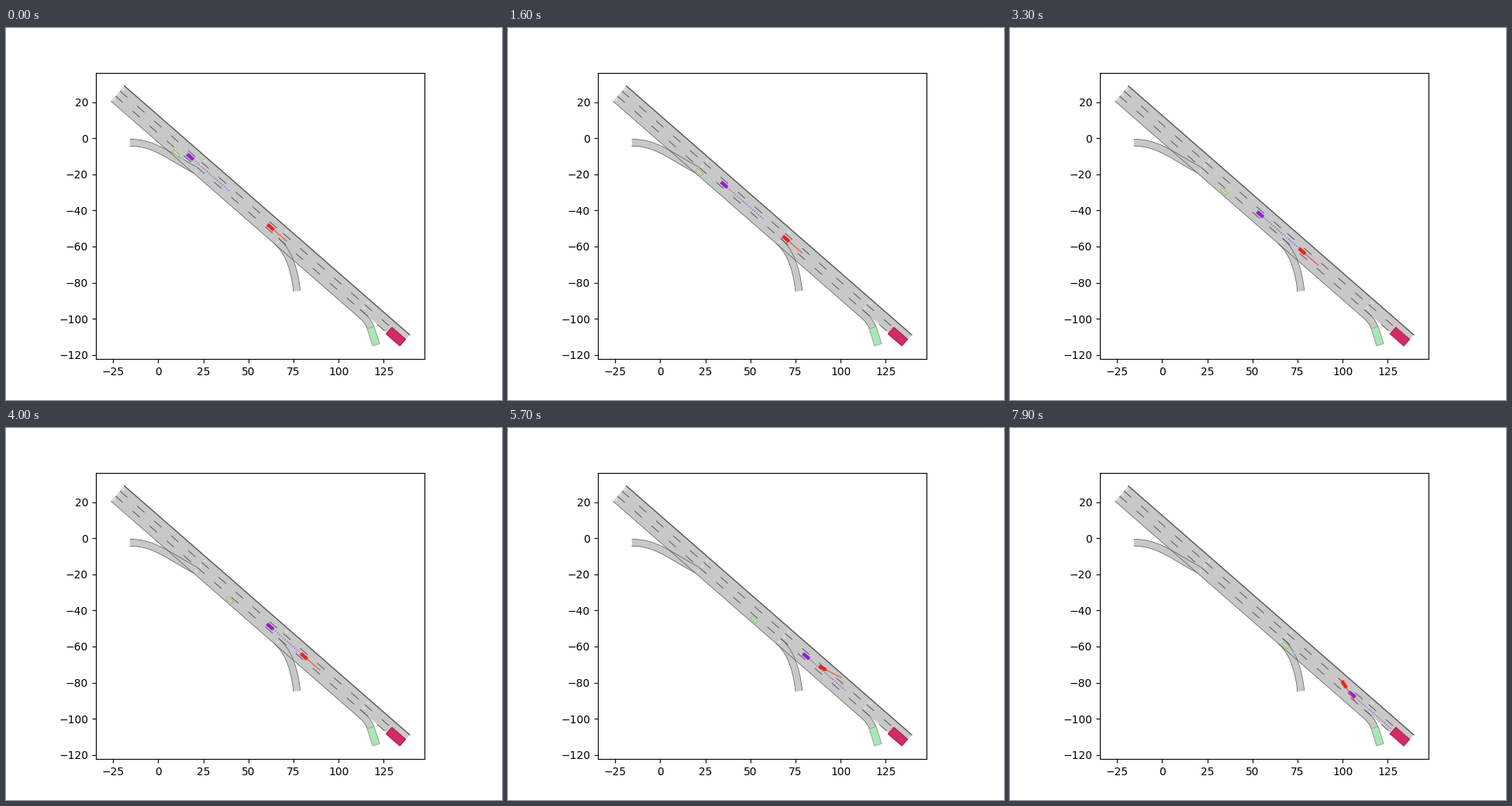
A matplotlib script that plays this animation: 640 by 480 pixels, repeating every 8000 ms.

```python
import numpy as np
import matplotlib.pyplot as plt
from matplotlib.animation import FuncAnimation
from matplotlib.patches import Polygon

plt.rcParams["lines.scale_dashes"] = False

FRAMES, STEP = 80, 100
ORIGIN = np.array([-18.7, 29.0])
ANGLE = -np.arctan2(321, 368)
LANE, SEG, LENGTH = 3.75, 60.0, 209.8
GREY, EDGE = "#c8c8c8", "#555555"


def unit(a):
    return np.array([np.cos(a), np.sin(a)])


ALONG, ACROSS = unit(ANGLE), unit(ANGLE - np.pi / 2)


def road(s, n):
    """Point s metres down the road, n metres right of its left edge."""
    return ORIGIN + s * ALONG + n * ACROSS


def box(center, a, length, width):
    f, r = unit(a) * length / 2, unit(a + np.pi / 2) * width / 2
    return np.array([center + f + r, center + f - r,
                     center - f - r, center - f + r])


def bezier(*p):
    t = np.linspace(0, 1, 40)[:, None]
    a, b, c, d = map(np.array, p)
    return ((1 - t) ** 3 * a + 3 * t * (1 - t) ** 2 * b
            + 3 * t ** 2 * (1 - t) * c + t ** 3 * d)


fig, ax = plt.subplots(figsize=(6.4, 4.8), dpi=100)
ax.set_aspect("equal")
ax.set_xlim(-34.6, 147.7)
ax.set_ylim(-122.4, 36.4)
ax.set_xticks(range(-25, 126, 25))
ax.set_yticks(range(-120, 21, 20))


def fill(pts, color, z=1, **kw):
    patch = Polygon(pts, closed=True, fc=color, zorder=z,
                    **{"ec": "none", "lw": 0, **kw})
    return ax.add_patch(patch)


def line(pts, color=EDGE, z=3, **kw):
    pts = np.asarray(pts)
    return ax.plot(pts[:, 0], pts[:, 1], color=color, zorder=z,
                   **{"lw": 0.5, **kw})[0]


def ramp(*p):
    mid = bezier(*p)
    d = np.gradient(mid, axis=0)
    d /= np.hypot(*d.T)[:, None]
    side = np.column_stack([-d[:, 1], d[:, 0]]) * LANE / 2 * 1.02
    fill(np.vstack([mid + side, (mid - side)[::-1]]), GREY)
    line(mid + side)
    line(mid - side)


def draw_road():
    full, two = 3 * LANE, 2 * LANE
    split = 3 * SEG
    fill([road(0, 0), road(split, 0), road(split, full), road(0, full)], GREY)
    fill([road(split, 0), road(LENGTH, 0), road(LENGTH, two),
          road(split, two)], GREY)
    line([road(0, 0), road(LENGTH, 0)], lw=1)
    line([road(0, full), road(split, full)])

    for i in range(4):
        a, b = i * SEG, min((i + 1) * SEG, LENGTH)
        for k in (1, 2):
            line([road(a, k * LANE), road(b, k * LANE)], "#444444", lw=0.6,
                 ls=(0, (9, 12)), dash_capstyle="butt")
        for k in range(3 if i < 3 else 2):
            n = (k + 0.5) * LANE
            fill([road(a + 0.3, n - 0.9), road(a + 0.3, n + 0.9),
                  road(a + 2.2, n)], "#dddddd", 2)

    ramp((-15.7, -2.4), (-2, -2.4), (6, -10), road(SEG, 2.5 * LANE))
    ramp(road(2 * SEG, 2.5 * LANE), (72, -62.5), (75.5, -72), (76.9, -84.7))
    ramp(road(split, 2.5 * LANE), (114, -99), (116.6, -101.5), (117.7, -104.9))


def draw_goals():
    fill(box(road(204.7, 5.8), ANGLE, 10.1, 4.9), "#d02c6c", 4,
         ec="#b8184f", lw=0.8)
    fill(box(np.array([119.3, -109.7]), -np.arctan2(22, 7), 9.9, 4.1),
         "#a2e8be", 4, ec="#b09a80", lw=0.7)


draw_road()
draw_goals()


def smooth(x):
    x = np.clip(x, 0, 1)
    return x * x * (3 - 2 * x)


def green_path(t):
    return road(46.2 + 9.8 * t, 9.4)


def purple_path(t):
    return road(53.3 + 14.7 * t, 5.65)


def red_path(t):
    swerve = np.cos(np.pi * np.clip((t - 6.9) / 4.4, -0.5, 0.5)) ** 2
    s = 112.5 + 6.15 * t + 1.3 * smooth((t - 4.7) / 1.9)
    return road(s, 5.72 - 2.54 * swerve)


class Car:
    """A vehicle with its predicted course ahead of it."""

    def __init__(self, path, fc, ec, reach, z, **course):
        self.path, self.reach = path, reach
        self.body = fill(np.zeros((4, 2)), fc, z + 0.5, ec=ec, lw=0.6)
        self.course = line(np.zeros((2, 2)), z=z, **course)

    def update(self, t):
        p = self.path(t)
        d = self.path(t + 0.01) - self.path(t - 0.01)
        a = np.arctan2(d[1], d[0])
        self.body.set_xy(box(p, a, 4.3, 1.7))
        ends = np.array([p + r * unit(a) for r in self.reach])
        self.course.set_data(ends[:, 0], ends[:, 1])
        return self.body, self.course


cars = [
    Car(green_path, "#a2e8b0", "#c8a070", (2.5, 15), 5,
        color="#a0dcbc", lw=0.7),
    Car(purple_path, "#9418d8", "#a030d0", (2.2, 28.5), 6,
        color="#8a2be2", lw=0.9, ls=(0, (0.9, 1.5)), dash_capstyle="butt"),
    Car(red_path, "#e8201c", "#f03828", (2.2, 11.7), 7,
        color="#f04a40", lw=0.8),
]


def draw(i):
    t = i * STEP / 1000
    return [artist for car in cars for artist in car.update(t)]


anim = FuncAnimation(fig, draw, frames=FRAMES, interval=STEP,
                     repeat=True, repeat_delay=0, blit=False)
plt.show()
```
